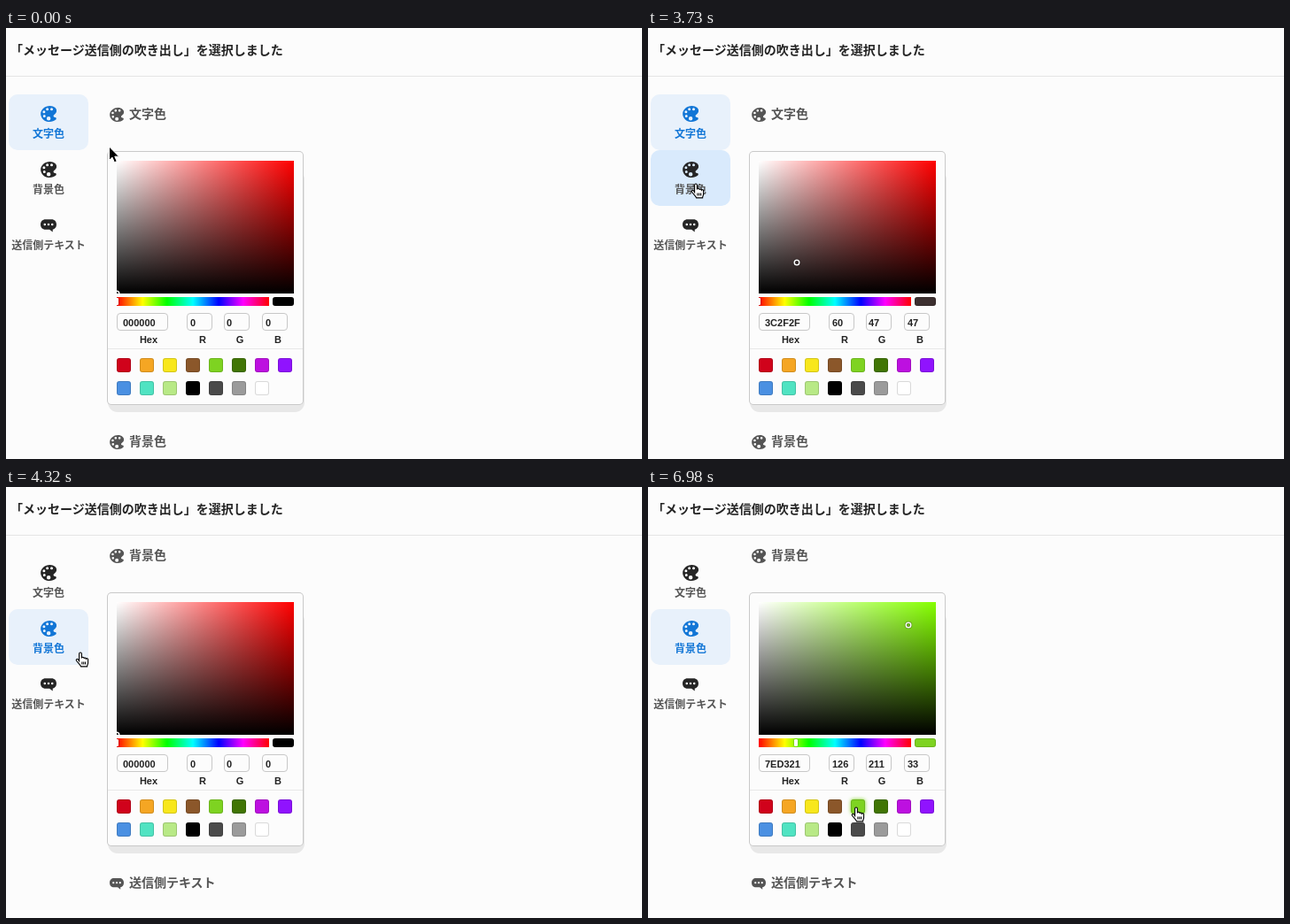
These frames come from a looping animation (718x487 px, 8000 ms). An HTML page:

```html
<!DOCTYPE html>
<html lang="ja">
<head>
<meta charset="utf-8">
<title>吹き出しの色設定</title>
<style>
  html, body { margin: 0; width: 100%; height: 100%; overflow: hidden; }
  body { position: relative; background: #fcfcfc; font: bold 14px/20px "Noto Sans CJK JP", "Noto Sans CJK", sans-serif; color: #555; white-space: nowrap; }
  body *, .panel::before { position: absolute; box-sizing: border-box; }
  svg * { position: static; }
  header { left: 0; top: 0; width: 100%; height: 55px; border-bottom: 1px solid #e5e5e5; color: #252525; }
  header span { left: 5px; top: 14px; }
  #view { left: 0; top: 55px; width: 100%; bottom: 0; overflow: hidden; }
  #scroll { left: 0; top: -55px; width: 100%; }
  #menu { left: 0; top: 0; }
  .icon { fill: currentColor; fill-rule: evenodd; }

  .item { left: 3px; width: 90px; height: 63px; border-radius: 10px; font-size: 12px; text-align: center; }
  .item .icon { left: 36px; top: 13px; width: 18px; height: 18px; color: #252525; }
  .item span { left: 0; width: 100%; top: 34px; }
  .item.hover { background: #d9eafc; }
  .item.active { background: #e8f1fb; color: #1276d6; }
  .item.active .icon { color: inherit; }

  .section { left: 0; top: 0; }
  .section > .icon { left: 117px; top: 90px; width: 16px; height: 16px; }
  .section > span { left: 139px; top: 86px; }

  .panel { left: 115px; top: 140px; width: 220px; height: 285px; font: bold 11px/20px "Liberation Sans", Arial, sans-serif; color: #222; }
  .panel::before { content: ""; left: 0; right: -2px; top: 20px; bottom: -9px; border-radius: 11px; background: #e8e8e8; }
  .card { inset: 0; border-radius: 4px; background: #fcfcfc; box-shadow: 0 0 0 1px #c9c9c9; }
  .area { left: 10px; top: 10px; width: 200px; height: 150px; overflow: hidden; }
  .shade { inset: 0; background: linear-gradient(to top, #000, transparent), linear-gradient(to right, #fff, rgba(255,255,255,0)); }
  .marker { width: 4px; height: 4px; margin: -2px; border-radius: 50%; box-shadow: 0 0 0 1.5px #fff, inset 0 0 1px 1px rgba(0,0,0,.3), 0 0 1px 2px rgba(0,0,0,.4); }
  .hue { left: 10px; top: 164px; width: 172px; height: 10px; overflow: hidden; background: linear-gradient(to right, #f00, #ff0 17%, #0f0 33%, #0ff 50%, #00f 67%, #f0f 83%, #f00); }
  .knob { top: 1px; width: 4px; height: 8px; margin-left: -2px; border-radius: 1px; background: #fff; box-shadow: 0 0 2px rgba(0,0,0,.6); }
  .preview { left: 186px; top: 164px; width: 24px; height: 10px; border-radius: 3px; box-shadow: inset 0 0 0 1px rgba(0,0,0,.15); }
  .field { top: 182px; height: 20px; border: 1px solid #c8c8c8; border-radius: 4px; line-height: 20px; }
  .label { top: 202px; width: 40px; text-align: center; }
  .rule { left: 0; top: 222px; width: 100%; height: 1px; background: #e8e8e8; }
  .swatch { width: 16px; height: 16px; border-radius: 3px; box-shadow: inset 0 0 0 1px rgba(0,0,0,.15); }
  .swatch.hover { box-shadow: inset 0 0 0 1px rgba(0,0,0,.15), 0 0 4px currentColor; }
  #pointer { left: 0; top: 0; width: 24px; height: 24px; overflow: visible; }
</style>
</head>
<body>
<svg width="0" height="0">
  <symbol id="palette" viewBox="62 64 382 384">
    <path d="M430 348c-7-6-16-8-25-9-11-2-16-4-22-10-15-13-15-31 0-44l30-27c46-41 46-108 0-149-34-30-80-45-128-45-55 0-114 20-158 60-84 74-84 195 0 268 41 37 97 56 153 56 56 0 111-18 150-53 14-12 12-36 0-47zM112 208a32 32 0 1 0 64 0a32 32 0 1 0-64 0zM120 311a32 32 0 1 0 64 0a32 32 0 1 0-64 0zM192 144a32 32 0 1 0 64 0a32 32 0 1 0-64 0zM208 367a48 48 0 1 0 96 0a48 48 0 1 0-96 0zM296 144a32 32 0 1 0 64 0a32 32 0 1 0-64 0z"/>
  </symbol>
  <symbol id="speech" viewBox="0 0 512 512">
    <path d="M160 64H352C450 64 512 130 512 228C512 320 460 376 390 388V470L290 392H160C62 392 0 326 0 228C0 130 62 64 160 64zM100 228a36 36 0 1 0 72 0a36 36 0 1 0-72 0zM220 228a36 36 0 1 0 72 0a36 36 0 1 0-72 0zM340 228a36 36 0 1 0 72 0a36 36 0 1 0-72 0z"/>
  </symbol>
</svg>
<div id="view"><div id="scroll"></div></div>
<header><span>「メッセージ送信側の吹き出し」を選択しました</span></header>
<nav id="menu"></nav>
<svg id="pointer">
  <path id="arrow" transform="translate(0 -1)" d="M.5 0V15.5L4 12.2 6.4 17.8 9.2 16.6 6.8 11.2H11.6Z" fill="#000" stroke="#fff"/>
  <g id="hand" transform="translate(-5.6 -.6)" stroke="#000" stroke-width="1.1">
    <path fill="#fff" d="M4.2 10.3V2A1.4 1.4 0 0 1 7 2V7A1.3 1.3 0 0 1 9.6 7.3A1.3 1.3 0 0 1 12 7.8A1.2 1.2 0 0 1 14.2 8.4V12C14.2 14 13.2 14.6 13.2 16.5H6.2C5.5 14 2.5 12 1 9.6C.4 8.6 1.8 7.4 3 8.4Z"/>
    <path d="M7.5 11v3M9.4 11v3M11.3 11v3"/>
  </g>
</svg>
<script>
const LOOP = 8000;
const SECTION_GAP = 370;
const ITEM_HEIGHT = 63;
const sections = [['文字色', 'palette'], ['背景色', 'palette'], ['送信側テキスト', 'speech']];
const swatches = ('D0021B F5A623 F8E71C 8B572A 7ED321 417505 BD10E0 9013FE ' +
  '4A90E2 50E3C2 B8E986 000000 4A4A4A 9B9B9B FFFFFF').split(' ');
const GREEN = swatches.indexOf('7ED321');
const fields = [['Hex', 10, 58, 6, 26], ['R', 89, 29, 3, 87], ['G', 131, 29, 2, 129], ['B', 174, 29, 3, 172]];
const byId = id => document.getElementById(id);
const icon = name => `<svg class="icon"><use href="#${name}"/></svg>`;

const panelHtml = () => `<div class="panel"><div class="card">
  <div class="area"><div class="shade"></div><div class="marker"></div></div>
  <div class="hue"><div class="knob"></div></div><div class="preview"></div>
  ${fields.map(([name, x, width, pad, labelX]) =>
    `<div class="field" style="left:${x}px;width:${width}px;padding-left:${pad}px"></div>
     <div class="label" style="left:${labelX}px">${name}</div>`).join('')}
  <div class="rule"></div>
  ${swatches.map((hex, i) => `<div class="swatch" style="background:#${hex};color:#${hex};
     left:${10 + i % 8 * 26}px;top:${233 + (i >> 3) * 26}px"></div>`).join('')}
</div></div>`;

byId('scroll').innerHTML = sections.map(([name, glyph], i) =>
  `<div class="section" style="top:${i * SECTION_GAP}px">${icon(glyph)}<span>${name}</span>${i < 2 ? panelHtml() : ''}</div>`).join('');
byId('menu').innerHTML = sections.map(([name, glyph], i) =>
  `<div class="item" style="top:${75 + i * ITEM_HEIGHT}px">${icon(glyph)}<span>${name}</span></div>`).join('');

const items = [...document.querySelectorAll('.item')];
const panels = [...document.querySelectorAll('.panel')].map(el => ({
  area: el.querySelector('.area'),
  marker: el.querySelector('.marker'),
  knob: el.querySelector('.knob'),
  preview: el.querySelector('.preview'),
  fields: [...el.querySelectorAll('.field')],
  swatches: [...el.querySelectorAll('.swatch')],
}));

// Motion is held in steps of 150 ms that finish at `end`.
const steps = (start, end, count, at) => Array.from({ length: count }, (_, i) =>
  [Math.max(start, end - (count - 1 - i) * 150), at(i)]);
const ease = p => p * p * (3 - 2 * p);
const mix = (a, b, p) => a.map((v, i) => v + (b[i] - v) * p);
const glide = (start, end, count, from, to) =>
  steps(start, end, count, i => mix(from, to, ease((i + 1) / count)));
const sample = (track, t) => track.reduce((last, [time, value]) => time <= t ? value : last, track[0][1]);

// Picks are [x, y, hue] inside the 200 x 150 colour area.
const black = [0, 150, 0];
const drag = (from, to, count) => i => mix(from, to, ease(Math.min(1, i / (count - 1))));
const textDrag = drag([123.35, 51.76, 0], [43.33, 114.71, 0], 8);
const backDrag = drag([77.6, 110.59, 0], [129.41, 40, 0], 5);
const picks = [
  [[0, black], ...steps(1800, 2840, 8, textDrag)],
  [[0, black], ...steps(5070, 6100, 8, backDrag), [6980, [168.72, 25.88, 88.65]]],
];

const backPath = i => {
  if (i > 4) return [[252, 198], [243, 262], [234, 314]][i - 5];
  const [x, y] = backDrag(i);
  return [x + 126, y + 125];
};
const pointerTrack = [
  [0, [116, 135]],
  ...steps(300, 600, 3, i => [[103, 158], [172, 188], [215, 201]][i]),
  ...steps(1200, 1350, 2, i => [[236, 203], [247, 201]][i]),
  ...steps(1800, 2840, 8, i => { const [x, y] = textDrag(i); return [x + 124, y + 150]; }),
  ...glide(3130, 3730, 5, [167, 265], [54, 176]),
  ...steps(4030, 4770, 6, i => i < 2 ? [[55, 176], [62, 178]][i] : mix([62, 178], [204, 235], ease((i - 1) / 4))),
  ...steps(5070, 6100, 8, backPath),
  ...glide(6240, 6830, 5, [234, 314], [235, 362]),
];
const scrollTrack = [[0, 0], ...steps(4030, 4320, 3, i => [140, 343, 390][i])];

function toRgb([x, y, hue]) {
  const s = x / 200, v = 255 * (1 - y / 150);
  return [5, 3, 1].map(n => {
    const k = (n + hue / 60) % 6;
    return Math.round(v - v * s * Math.max(0, Math.min(k, 4 - k, 1)));
  });
}

function drawPanel(panel, pick) {
  const [x, y, hue] = pick;
  const rgb = toRgb(pick);
  const hex = rgb.map(c => c.toString(16).padStart(2, '0')).join('').toUpperCase();
  panel.area.style.background = `hsl(${hue}, 100%, 50%)`;
  panel.marker.style.left = x + 'px';
  panel.marker.style.top = y + 'px';
  panel.knob.style.left = hue / 360 * 100 + '%';
  panel.preview.style.backgroundColor = '#' + hex;
  [hex, ...rgb].forEach((text, i) => { panel.fields[i].textContent = text; });
}

function render(t) {
  const scroll = sample(scrollTrack, t);
  const [x, y] = sample(pointerTrack, t);
  const hovered = x >= 3 && x < 93 ? Math.floor((y - 75) / ITEM_HEIGHT) : -1;
  const onGreen = t > 6240 && y >= 353;
  const isHand = onGreen || (hovered >= 0 && hovered < items.length);

  byId('scroll').style.transform = `translateY(${-scroll}px)`;
  items.forEach((item, i) => {
    item.classList.toggle('active', i === (t < 4320 ? 0 : 1));
    item.classList.toggle('hover', i === hovered);
  });
  panels.forEach((panel, i) => drawPanel(panel, sample(picks[i], t)));
  panels[1].swatches[GREEN].classList.toggle('hover', onGreen);

  byId('pointer').style.transform = `translate(${Math.round(x)}px, ${Math.round(y)}px)`;
  byId('arrow').style.display = isHand ? 'none' : '';
  byId('hand').style.display = isHand ? '' : 'none';
}

const begin = performance.now();
function tick() {
  render((performance.now() - begin) % LOOP);
  requestAnimationFrame(tick);
}
tick();
</script>
</body>
</html>
```
